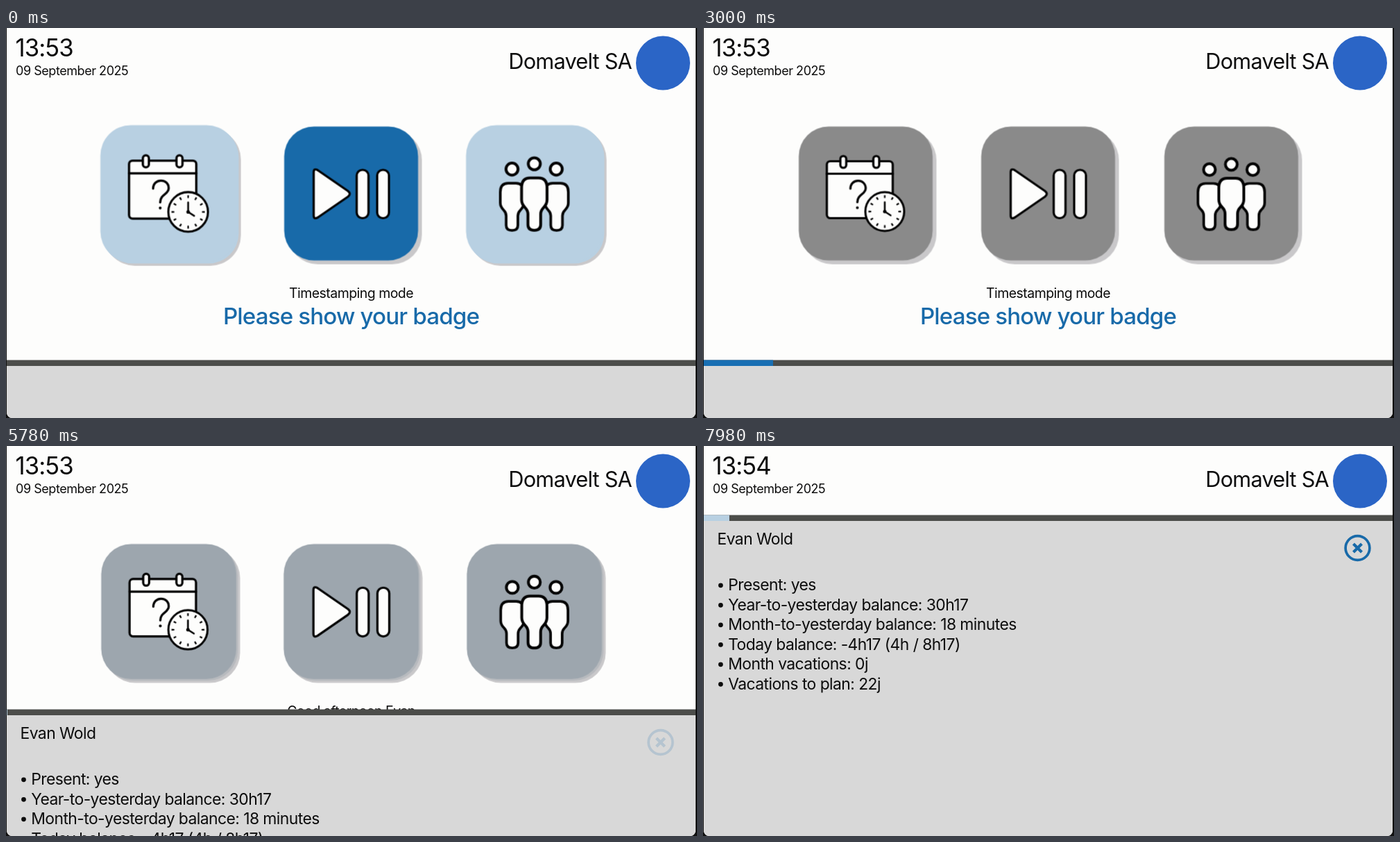
An HTML page for the animation above (8 s loop, 996 by 562 pixels).

```html
<!DOCTYPE html>
<html lang="en">
<head>
<meta charset="utf-8">
<title>Time clock</title>
<style>
  html, body { margin: 0; width: 100%; height: 100%; overflow: hidden; background: #111; }
  svg { display: block; width: 996px; height: 562px; }
  text {
    font-family: Inter, sans-serif;
    font-optical-sizing: none;
    letter-spacing: -.025em;
    fill: #0c0c0c;
    white-space: pre;
  }
  .clock { font-size: 34.7px; }
  .date { font-size: 18px; }
  .company { font-size: 30.7px; text-anchor: end; }
  .hint { font-size: 19.4px; text-anchor: middle; }
  .title { font-size: 33.1px; font-weight: 500; text-anchor: middle; }
  .info text { font-size: 22.9px; }

  .anim, .cut { animation: 8s linear infinite; }
  .cut { animation-timing-function: step-end; }

  /* hard switches */
  .ask { animation-name: ask; }
  .done { animation-name: done; }
  .min-a { animation-name: minA; }
  .min-b { animation-name: minB; }
  .info { animation-name: info; }
  .busy { animation-name: busy; }
  @keyframes ask { 0% { opacity: 1 } 46.25%, 100% { opacity: 0 } }
  @keyframes done { 0% { opacity: 0 } 46.25%, 100% { opacity: 1 } }
  @keyframes minA { 0% { opacity: 1 } 81.25%, 100% { opacity: 0 } }
  @keyframes minB { 0% { opacity: 0 } 81.25%, 100% { opacity: 1 } }
  @keyframes info { 0% { opacity: 0 } 71.17%, 100% { opacity: 1 } }
  @keyframes busy { 0% { opacity: 1 } 71.25%, 100% { opacity: 0 } }

  /* buttons: idle, locked, idle again */
  .face { fill: currentColor; }
  .side { animation-name: side; }
  .main { animation-name: main; }
  .side .rim { animation-name: sideRim; }
  .main .rim { animation-name: mainRim; }
  @keyframes side {
    0%, 33.1% { color: #b8d0e2; transform: scale(1.02) }
    35.6%, 71.25% { color: #8a8a8a; transform: scale(1) }
    73.75%, 100% { color: #b8d0e2; transform: scale(1.02) }
  }
  @keyframes main {
    0%, 33.1% { color: #186aa9; transform: scale(1) }
    35.6%, 71.25% { color: #8a8a8a; transform: scale(1) }
    73.75%, 100% { color: #b8d0e2; transform: scale(1.02) }
  }
  @keyframes sideRim {
    0%, 33.1% { opacity: 1 }
    35.6%, 71.25% { opacity: 0 }
    73.75%, 100% { opacity: 1 }
  }
  @keyframes mainRim {
    0%, 71.25% { opacity: 0 }
    73.75%, 100% { opacity: 1 }
  }
  .icon { fill: #fdfdfc; stroke: #000; stroke-width: 3.2; stroke-linejoin: round; stroke-linecap: round; }
  .line { fill: none; }

  /* sliding panel and its progress strip */
  .panel { animation-name: slide; }
  @keyframes slide {
    0% { transform: none }
    71.175% { transform: none; animation-timing-function: cubic-bezier(.333, .667, .667, 1) }
    78.925%, 100% { transform: translateY(-379px) }
  }
  .grow { transform-box: fill-box; transform-origin: 0 0; }
  .head { animation-name: head; }
  .tail { animation-name: tail; }
  .timer { animation-name: timer; }
  @keyframes head {
    0% { transform: scaleX(0) }
    33.5% { transform: scaleX(0); animation-timing-function: cubic-bezier(.37, 0, .63, 1) }
    52.9%, 55.58% { transform: scaleX(1) }
    55.59% { transform: scaleX(0); animation-timing-function: cubic-bezier(.37, 0, .63, 1) }
    74.99%, 100% { transform: scaleX(1) }
  }
  @keyframes tail {
    0% { transform: scaleX(0) }
    45.4% { transform: scaleX(0); animation-timing-function: cubic-bezier(.333, 0, .667, .333) }
    55.58% { transform: scaleX(1) }
    55.59% { transform: scaleX(0) }
    67.5% { transform: scaleX(0); animation-timing-function: cubic-bezier(.333, 0, .667, .333) }
    77.6%, 100% { transform: scaleX(1) }
  }
  @keyframes timer {
    0%, 71.5% { transform: scaleX(0) }
    100% { transform: scaleX(.038) }
  }
  .close { fill: none; stroke: #186aa9; stroke-width: 3.7; animation-name: close; }
  @keyframes close {
    0%, 71.2% { opacity: 0 }
    77%, 100% { opacity: 1 }
  }
</style>
</head>
<body>
<svg viewBox="0 0 996 562">
  <defs>
    <clipPath id="screen"><path d="M1 0H994V554a8 8 0 0 1-8 8H9a8 8 0 0 1-8-8Z"/></clipPath>
    <rect id="tile" x="-96.5" y="-96.5" width="193" height="193" rx="43"/>
    <rect id="strip" x="1" y="478.5" width="994" height="8.5"/>
    <path id="torso" d="M-18 14Q-18 0-6 0H6Q18 0 18 14V31Q18 37 13 42Q9 46 9 51V66Q9 74 0 74Q-9 74-9 66V51Q-9 46-13 42Q-18 37-18 31Z"/>
  </defs>
  <rect width="996" height="562" fill="#111"/>
  <g clip-path="url(#screen)">
    <rect width="996" height="562" fill="#fdfdfc"/>

    <text class="clock cut min-a" x="13.5" y="40.5">13:53</text>
    <text class="clock cut min-b" x="13.5" y="40.5">13:54</text>
    <text class="date" x="14" y="67.5">09 September 2025</text>
    <text class="company" x="902" y="59">Domavelt SA</text>
    <circle cx="947" cy="50.5" r="39" fill="#2b65c6"/>

    <g transform="translate(234.5 238.5)">
      <g class="anim side">
        <use href="#tile" x="5.5" y="5.5" fill="#c9c8ca"/>
        <use href="#tile" x="2.5" y="2.5" class="anim face rim"/>
        <use href="#tile" class="face"/>
        <g class="icon" transform="translate(-234.5 -238.5)">
          <rect x="178.5" y="192" width="95" height="82" rx="5"/>
          <path class="line" d="M178.5 210H273.5"/>
          <rect x="198" y="184.5" width="8.5" height="17" rx="4.2"/>
          <rect x="245.5" y="184.5" width="8.5" height="17" rx="4.2"/>
          <path class="line" d="M212.5 231.5C212.5 216.5 234.5 216.5 234.5 231C234.5 240 222.5 239.5 222.5 251"/>
          <circle cx="222.5" cy="259" r="2" fill="#000" stroke="none"/>
          <circle cx="262" cy="264.5" r="28" stroke-width="3"/>
          <circle cx="262" cy="264.5" r="21.5" class="line" stroke-width="4" stroke-linecap="butt"
            pathLength="120" stroke-dasharray="2 8" stroke-dashoffset="1"/>
          <path class="line" stroke-width="2.5" d="M262 251V264.5L270.5 270"/>
          <circle cx="262" cy="264.5" r="2.5" fill="#000" stroke="none"/>
        </g>
      </g>
    </g>

    <g transform="translate(497.5 238.5)">
      <g class="anim main">
        <use href="#tile" x="5.5" y="5.5" fill="#c9c8ca"/>
        <use href="#tile" x="2.5" y="2.5" class="anim face rim"/>
        <use href="#tile" class="face"/>
        <g class="icon" transform="translate(-497.5 -238.5)">
          <path d="M443.5 208Q443.5 201.5 449.5 205L493 235Q498 239 493 243L449.5 273Q443.5 276.5 443.5 270Z"/>
          <rect x="505.5" y="204.5" width="17" height="69.5" rx="8"/>
          <rect x="535" y="204.5" width="17" height="69.5" rx="8"/>
        </g>
      </g>
    </g>

    <g transform="translate(761.5 238.5)">
      <g class="anim side">
        <use href="#tile" x="5.5" y="5.5" fill="#c9c8ca"/>
        <use href="#tile" x="2.5" y="2.5" class="anim face rim"/>
        <use href="#tile" class="face"/>
        <g class="icon" transform="translate(-761.5 -238.5)" style="stroke-width:4">
          <circle cx="730" cy="204" r="8.5"/>
          <circle cx="792.5" cy="204" r="8.5"/>
          <circle cx="761.5" cy="196.5" r="8.5"/>
          <use href="#torso" transform="translate(730 224) scale(.92 .9)"/>
          <use href="#torso" transform="translate(793 224) scale(.92 .9)"/>
          <use href="#torso" transform="translate(761.5 216.5)"/>
        </g>
      </g>
    </g>

    <g class="cut ask">
      <text class="hint" x="497.5" y="389">Timestamping mode</text>
      <text class="title" x="497.5" y="427" style="fill:#186aa9">Please show your badge</text>
    </g>
    <g class="cut done">
      <text class="hint" x="497.5" y="389">Good afternoon Evan</text>
      <text class="title" x="497.5" y="427" style="fill:#1ca637">Entry recorded</text>
    </g>

    <g class="anim panel">
      <rect x="1" y="479" width="994" height="470" fill="#d8d8d8"/>
      <use href="#strip" fill="#4c4d4a"/>
      <g class="cut busy">
        <use href="#strip" class="anim grow head" fill="#186fb3"/>
        <use href="#strip" class="anim grow tail" fill="#4c4d4a"/>
      </g>
      <use href="#strip" class="anim grow timer" fill="#b8d0e2"/>
      <g class="anim close">
        <circle cx="943.5" cy="526" r="17.4"/>
        <path stroke-width="4.2" d="M937.5 520l12 12m0-12l-12 12"/>
      </g>
      <g class="cut info">
        <text x="20.5" y="520.5">Evan Wold</text>
        <g transform="translate(36.2 587.3)">
          <text>Present: yes</text>
          <text y="28.5">Year-to-yesterday balance: 30h17</text>
          <text y="57">Month-to-yesterday balance: 18 minutes</text>
          <text y="85.5">Today balance: -4h17 (4h / 8h17)</text>
          <text y="114">Month vacations: 0j</text>
          <text y="142.5">Vacations to plan: 22j</text>
          <path d="M-10.700-7.500V136" fill="none" stroke="#0c0c0c" stroke-width="6.8"
            stroke-linecap="round" stroke-dasharray=".01 28.490"/>
        </g>
      </g>
    </g>
  </g>
</svg>
</body>
</html>
```
